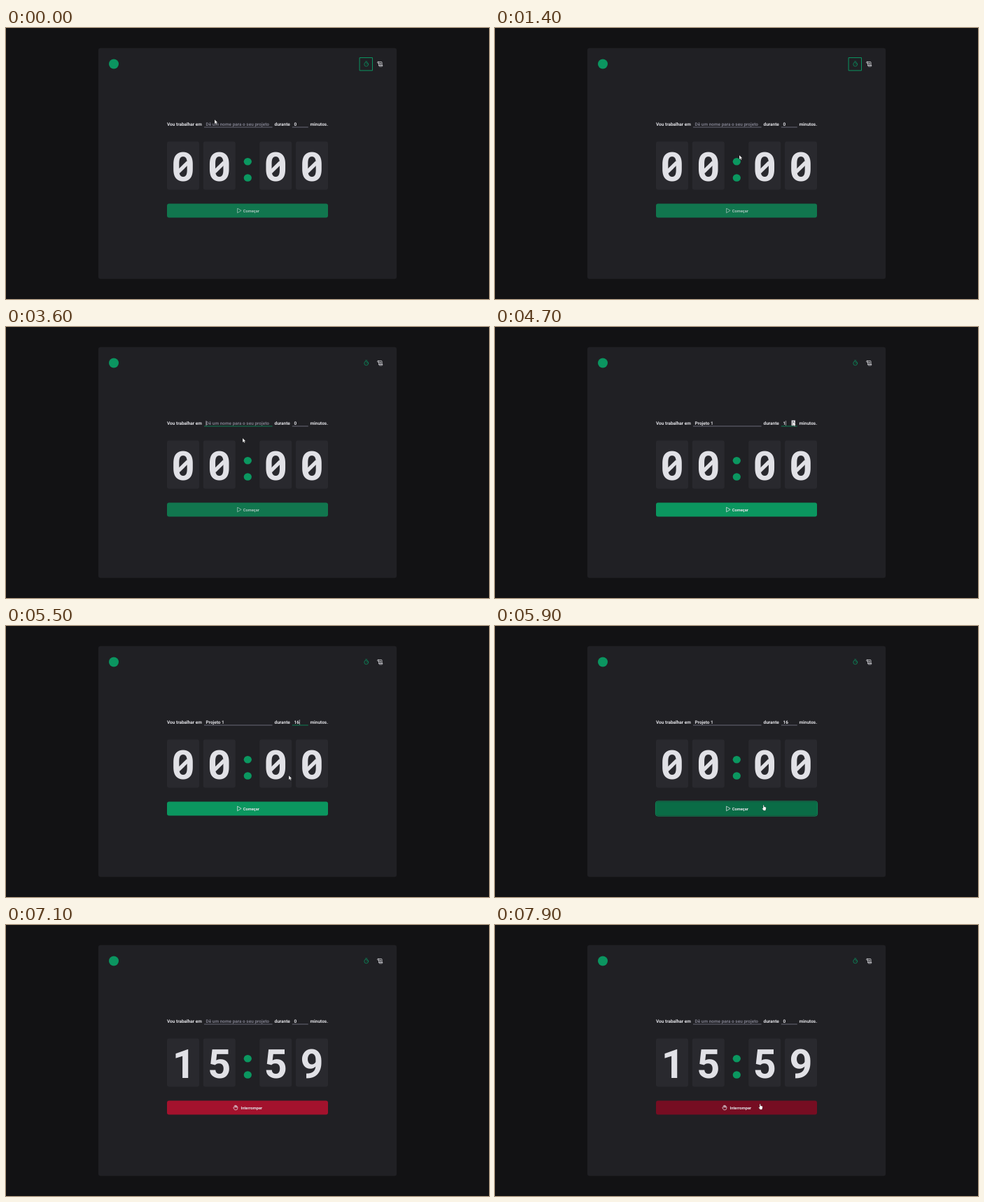
Animation of 690 by 388 pixels, one loop 8 s. Source, as an HTML page:

```html
<!DOCTYPE html>
<html lang="pt-BR">
<head>
<meta charset="utf-8">
<title>Timer</title>
<style>
  html, body { margin: 0; width: 100%; height: 100%; overflow: hidden; background: #121214; }
  svg { display: block; width: 100vw; height: 100vh; }
  text { font: bold 6.47px Roboto, Arial, sans-serif; fill: #e1e1e6; text-rendering: geometricPrecision; white-space: pre; }
  .digit { font-size: 57.5px; text-anchor: middle; }
  .label { font-size: 5.75px; }
  .icon { fill: none; stroke: #e1e1e6; stroke-width: .75; stroke-linejoin: round; stroke-linecap: round; }
  .green { stroke: #0a9360; }
</style>
</head>
<body>
<svg viewBox="0 0 690 388">
  <rect x="132" y="28.7" width="426" height="330.5" rx="3" fill="#202024"/>
  <circle cx="154" cy="51.5" r="7" fill="#0b9560"/>

  <rect id="navFocus" class="icon green" x="505.5" y="42.5" width="18" height="18.4" style="stroke-width:1"/>
  <g class="icon green">
    <circle cx="514.7" cy="52" r="2.9"/>
    <path d="M513.6 47.9h2.2M514.7 52l1.5-1.5"/>
  </g>
  <path class="icon" d="M532.6 53.4V49.4q0-1-1-1t-1 1 1 1h1M531.6 48.4h4.5q1 0 1 1v4M533.6 53.5h4.3q.2 1.5-1.3 1.5h-2.7q-1.3 0-1.3-1.6M533.8 50.4h2M533.8 52h2"/>

  <text x="230" y="139.9">Vou trabalhar em</text>
  <text id="project" x="285.5" y="139.9"></text>
  <text x="383.5" y="139.9">durante</text>
  <text id="minutes" x="411.5" y="139.9"></text>
  <text x="434.5" y="139.9">minutos.</text>
  <rect id="projectLine" x="283" y="141.6" width="97.6" height=".8"/>
  <rect id="minutesLine" x="408.8" y="141.6" width="23" height=".8"/>
  <rect id="caret" y="134.2" width=".6" height="7" fill="#e1e1e6"/>
  <g id="spinner">
    <rect x="423.6" y="133.6" width="5.4" height="7.6" fill="#d8d8dc"/>
    <path d="M424.8 136.6l1.5-1.7 1.5 1.7zM424.8 138.4l1.5 1.7 1.5-1.7z" fill="#55555c"/>
  </g>

  <g id="cards"></g>
  <g fill="#0b9760">
    <ellipse cx="345.3" cy="191.2" rx="5.6" ry="5.3"/>
    <ellipse cx="345.3" cy="214.5" rx="5.6" ry="5.3"/>
  </g>

  <rect id="buttonFocus" x="229.4" y="250.9" width="231.2" height="21.2" rx="3.2" fill="none" stroke="#0aa568" stroke-width=".8"/>
  <rect id="button" x="230" y="251.5" width="230" height="20" rx="2.9"/>
  <g id="start">
    <path class="icon" d="M330.6 258.5v6.2l5.2-3.1z"/>
    <text class="label" x="338.7" y="263.6">Começar</text>
  </g>
  <g id="stop">
    <path class="icon" d="M326.1 260.7v-1.5q.6-.9 1.2 0v-.7q.6-.9 1.3 0v.6q.6-.7 1.2.1v1.2q1-.5 1.1.4v1.4q0 2.6-2.8 2.6-1.6 0-2.3-1.2l-1-2q.3-1.2 1.3-.1M327.3 259.2v1.8M328.6 259v2M329.8 260v1.2"/>
    <text class="label" x="335.5" y="263.6">Interromper</text>
  </g>

  <g id="cursor">
    <path id="arrow" d="M0 0v6.2l1.5-1.3 1 2.2 1-.5-1-2.1h2z" fill="#fff" stroke="#111" stroke-width=".3"/>
    <path id="beam" d="M-1 0h2M0 0v6M-1 6h2" fill="none" stroke="#d0d0d4" stroke-width=".6"/>
    <path id="hand" d="M0 0q.7-.7 1.3 0v2.3l2.2.5q.9.3.8 1.4l-.5 2.8q-.2.8-1 .8H.8L-1.4 4.9q.1-1 1.4-.2z" fill="#fff" stroke="#111" stroke-width=".3"/>
  </g>
</svg>
<script>
const LOOP = 8000;
const $ = id => document.getElementById(id);
const show = (id, on) => $(id).style.display = on ? '' : 'none';
const fill = (id, colour) => $(id).setAttribute('fill', colour);

// Each track lists [start time, value]; a value holds until the next one.
const at = (track, t) => track.findLast(([start]) => start <= t)[1];

const pointer = [
  [0, ['arrow', 298, 131]], [100, ['arrow', 374, 171]], [200, ['arrow', 303, 132]],
  [700, ['arrow', 135, 78]], [900, ['arrow', 95, 51]], [1000, ['arrow', 150, 85]],
  [1100, ['arrow', 215, 120]], [1200, ['arrow', 275, 150]], [1300, ['arrow', 325, 172]],
  [1400, ['arrow', 349, 182]], [1800, ['arrow', 440, 235]], [1900, ['arrow', 503, 260]],
  [2100, ['arrow', 496, 261]], [2400, ['arrow', 430, 250]], [2500, ['arrow', 382, 244]],
  [3000, ['arrow', 352, 178]], [3100, ['beam', 339, 137]], [3500, ['arrow', 338, 148]],
  [3600, ['arrow', 338, 159]], [4100, ['beam', 400, 136]], [4300, ['beam', 418, 135]],
  [4500, ['arrow', 425.5, 135.5]], [5400, ['arrow', 422, 158]], [5500, ['arrow', 404, 214]],
  [5600, ['hand', 383, 256.5]], [6600, ['arrow', 344, 241]], [6900, ['none', 0, 0]],
  [7600, ['arrow', 346, 244]], [7800, ['hand', 378, 256.5]]
];
const project = [[0, ''], [3900, 'Proj'], [4000, 'Projeto 1'], [6100, '']];
const minutes = [[0, '0'], [4600, '1'], [4800, '6'], [5000, '11'], [5200, '16'], [6100, '0']];
const focus = [[0, 'nav'], [3100, 'project'], [4300, 'minutes'], [5700, 'button'], [6100, '']];
const clock = [[0, '0000'], [6100, '1600'], [7100, '1559']];
const buttonColour = [
  [0, '#11764e'], [4000, '#0b965f'], [5600, '#0a6c46'],
  [6100, '#760d22'], [6600, '#a3122d'], [7800, '#760d22']
];

const centres = [253, 304.8, 385.2, 437];
$('cards').innerHTML = centres.map(x => `
  <rect x="${x - 23}" y="162.4" width="46" height="69" rx="2.9" fill="#29292e"/>
  <text class="digit" x="${x}" y="219.4"></text>
  <path d="M${x - 7} 206.2L${x + 7} 192.4" stroke="#e1e1e6" stroke-width="5.4"/>`).join('');
const digits = [...document.querySelectorAll('.digit')];

function drawField(id, value, focused) {
  $(id).textContent = value;
  fill(id + 'Line', focused ? '#0b9760' : '#7c7c8a');
}

function draw(t) {
  const name = at(project, t), mins = at(minutes, t), focused = at(focus, t);
  drawField('project', name || 'Dê um nome para o seu projeto', focused === 'project');
  $('project').style.fill = name ? '#e1e1e6' : '#7c7c8a';
  drawField('minutes', mins, focused === 'minutes');

  const field = { project: name, minutes: mins }[focused];
  show('caret', field !== undefined);
  if (field !== undefined) {
    const input = $(focused);
    $('caret').setAttribute('x', +input.getAttribute('x') + (field ? input.getComputedTextLength() : 0) + .2);
  }
  show('spinner', focused === 'minutes' && t >= 4500 && t < 5400);
  show('navFocus', focused === 'nav');
  show('buttonFocus', focused === 'button');

  [...at(clock, t)].forEach((d, i) => {
    digits[i].textContent = d;
    digits[i].setAttribute('x', centres[i] + (d === '1' ? 1.3 : 0));
    digits[i].nextElementSibling.style.display = d === '0' ? '' : 'none';
  });

  fill('button', at(buttonColour, t));
  show('start', t < 6100);
  show('stop', t >= 6100);
  $('start').style.opacity = t < 4000 ? .7 : 1;

  const [shape, x, y] = at(pointer, t);
  for (const id of ['arrow', 'beam', 'hand']) show(id, id === shape);
  $('cursor').setAttribute('transform', `translate(${x} ${y})`);
}

let begin;
function tick(now) {
  begin ??= now;
  draw((now - begin) % LOOP);
  requestAnimationFrame(tick);
}
draw(0);
requestAnimationFrame(tick);
</script>
</body>
</html>
```
